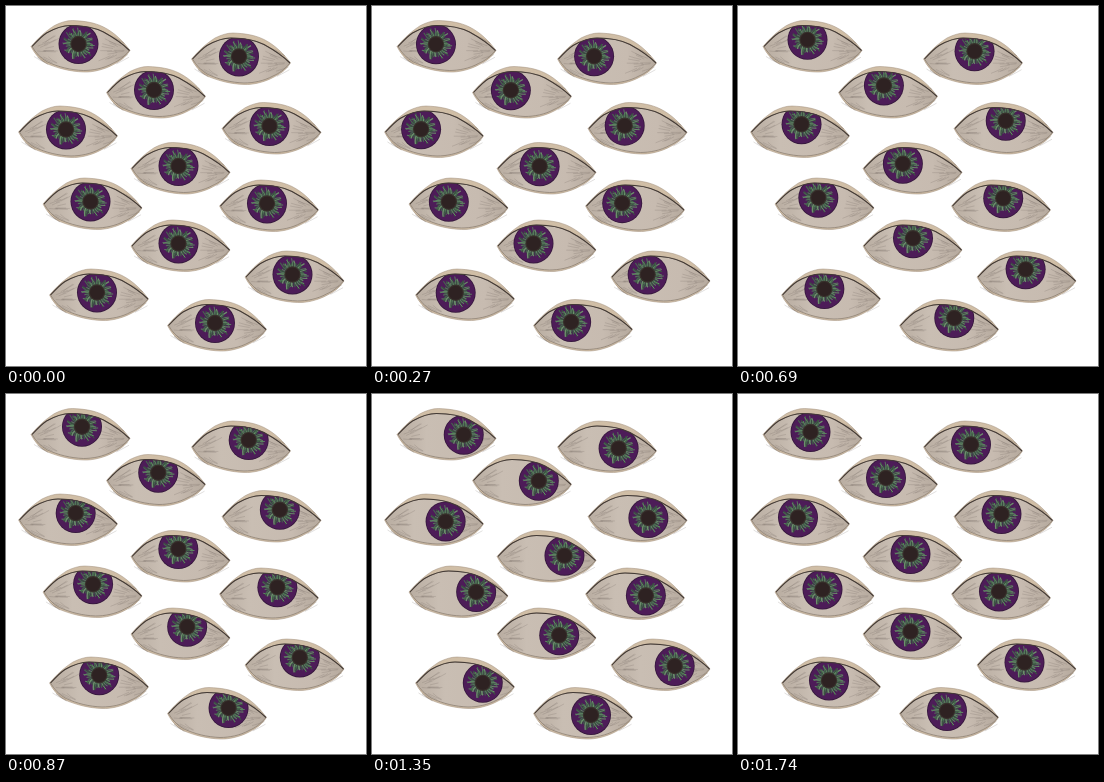
Animation of 360x360 px, one loop 1.77 s. Source, as an HTML page with a canvas:

```html
<!DOCTYPE html>
<html lang="en">
<head>
<meta charset="utf-8">
<title>Looking eyes</title>
<style>
html, body { margin: 0; width: 100%; height: 100%; overflow: hidden; background: #fff; }
canvas { display: block; }
</style>
</head>
<body>
<canvas id="stage" width="360" height="360"></canvas>
<script>
const ctx = document.getElementById('stage').getContext('2d');
const LOOP = 1770, STEP = 30;
const REST = { x: -2, y: -2.5 };

// every eye follows one gaze path; lag is how far it trails in mid-loop, in ms
const eyes = [
  { x: 74.5, y: 40.5, lag: 285 }, { x: 150, y: 86.5, lag: 265 }, { x: 235, y: 53, lag: 110 },
  { x: 62, y: 126, lag: 110 }, { x: 265.5, y: 122.5, lag: 90 }, { x: 174.5, y: 162.5, lag: 385 },
  { x: 86.5, y: 198, lag: 310 }, { x: 263, y: 200, lag: 90 }, { x: 174.5, y: 240, lag: 140 },
  { x: 93, y: 289, lag: 320 }, { x: 288.5, y: 271, lag: 180 }, { x: 211, y: 319.5, lag: 0 }
];

// centre, left, up, upper right, right, lower right, centre
const gaze = [
  { t: 0, x: 0, y: 0 }, { t: 200, x: -11, y: 0 }, { t: 490, x: 0, y: -5 },
  { t: 800, x: 11, y: -4 }, { t: 1110, x: 20, y: 2 }, { t: 1350, x: 10, y: 4 },
  { t: 1640, x: 0, y: 0 }, { t: LOOP, x: 0, y: 0 }
];

// smooth curve through the gaze points, at rest at both ends
function gazeAt(t, axis) {
  const last = gaze.length - 2;
  let i = 0;
  while (i < last && t >= gaze[i + 1].t) i++;
  const slope = k => k < 1 || k >= last ? 0 :
    (gaze[k + 1][axis] - gaze[k - 1][axis]) / (gaze[k + 1].t - gaze[k - 1].t);
  const from = gaze[i], to = gaze[i + 1];
  const h = to.t - from.t, u = (t - from.t) / h, v = 1 - u;
  return v * v * (1 + 2 * u) * from[axis] + u * u * (3 - 2 * u) * to[axis]
    + h * u * v * (v * slope(i) - u * slope(i + 1));
}

let seed = 11;
const rand = (lo, hi) => {
  seed = (seed * 16807) % 2147483647;
  return lo + (hi - lo) * seed / 2147483647;
};

const body = new Path2D('M-49.5 0C-42-9-34-16-26-21C-20-24-14-26-8-26C4-25.5 14-24 23-19.5C34-14 43-5 49.5 4C44 12 39 15 33 18C24 23 12 26 3 25.5C-10 25-22 22-34 17C-41 13-46 7-49.5 0Z');
const upper = 'M-48.5 0C-42-7-38-11-34-13.5C-26-18-18-21-10-21C4-21 14-19 23-14.5C33-9 42-3 49 4';
const lidLine = new Path2D(upper);
const opening = new Path2D(upper + 'C43 11 38 14.5 32 17C23 22 12 24 3 24C-10 23.5-22 20.5-33 15.5C-40 12-45 6-48.5 0Z');

// pencil hatching that runs into both corners
const hatch = new Path2D();
for (let i = 0; i < 34; i++) {
  const side = i % 2 ? 1 : -1, y = rand(-11, 18), x = rand(18, 36);
  hatch.moveTo(side * x, y);
  hatch.quadraticCurveTo(side * (x + 5), y * .8 + 1, side * (x + rand(8, 14)), y * .5 + 2);
}

const greens = ['#44684c', '#5c8260', '#38563f', '#6c8f6b'];
const fibres = Array.from({ length: 54 }, (_, i) => {
  const angle = i / 54 * Math.PI * 2 + rand(-.08, .08);
  const bend = angle + rand(-.3, .3), r = rand(10.5, 17);
  const path = new Path2D();
  path.moveTo(6 * Math.cos(angle), 6 * Math.sin(angle));
  path.quadraticCurveTo(11 * Math.cos(angle), 11 * Math.sin(angle), r * Math.cos(bend), r * Math.sin(bend));
  return { path, color: greens[i % greens.length], width: rand(.7, 1.4) };
});

const shade = ctx.createLinearGradient(-50, 0, 50, 0);
shade.addColorStop(0, '#b8aca0');
shade.addColorStop(.3, '#c9beb3');
shade.addColorStop(.7, '#c7bbb0');
shade.addColorStop(1, '#b5a99d');

function line(path, color, width) {
  ctx.strokeStyle = color;
  ctx.lineWidth = width;
  ctx.stroke(path);
}

function fill(path, color) {
  ctx.fillStyle = color;
  ctx.fill(path);
}

function disc(r, color) {
  const path = new Path2D();
  path.arc(0, 0, r, 0, Math.PI * 2);
  fill(path, color);
}

function drawIris() {
  disc(20, '#35183c');
  disc(19.2, '#4d1c58');
  disc(12, '#40344a');
  for (const f of fibres) line(f.path, f.color, f.width);
  disc(8.2, '#38302c');
  disc(7, '#2e2222');
}

function drawEye({ x, y, lag }, t) {
  const own = t - lag * Math.sin(Math.PI * t / LOOP);
  ctx.save();
  ctx.translate(x, y);
  fill(body, '#d0bea6');
  line(body, '#a08f7c', .5);
  fill(opening, shade);
  line(hatch, 'rgba(101,91,82,.28)', .7);
  line(opening, '#85796d', .7);
  ctx.save();
  ctx.clip(opening);
  ctx.translate(REST.x + gazeAt(own, 'x'), REST.y + gazeAt(own, 'y'));
  drawIris();
  ctx.restore();
  line(lidLine, '#433a35', 1.1);
  ctx.restore();
}

function frame(now) {
  const t = Math.floor(now % LOOP / STEP) * STEP;
  ctx.fillStyle = '#fff';
  ctx.fillRect(0, 0, 360, 360);
  for (const eye of eyes) drawEye(eye, t);
  requestAnimationFrame(frame);
}
frame(0);
</script>
</body>
</html>
```
